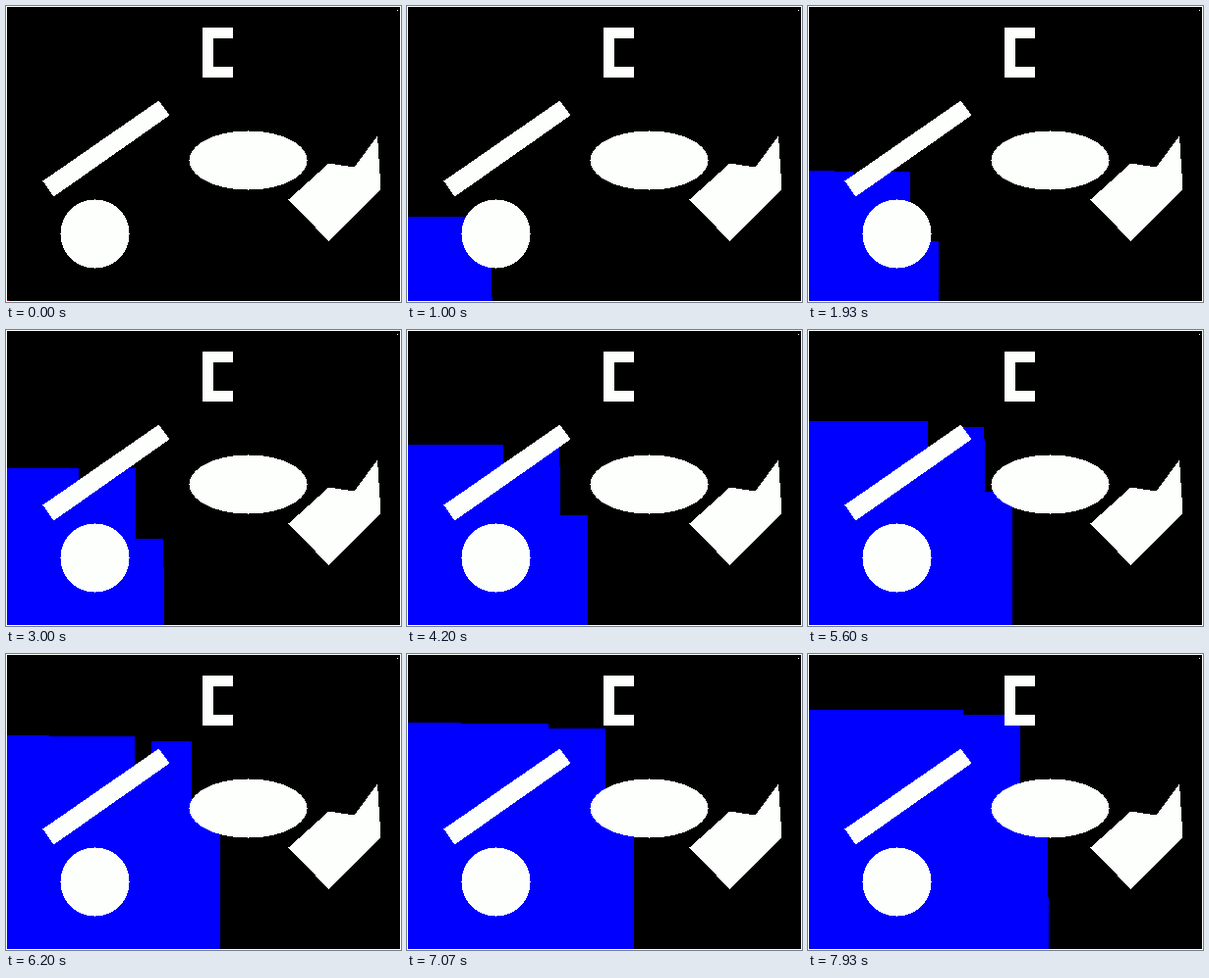
Animation of 402x302 px, one loop 8000 ms. Source, as an HTML page with a canvas:

```html
<!DOCTYPE html>
<html lang="en">
<head>
<meta charset="utf-8">
<title>Breadth-first flood around obstacles</title>
<style>
  html, body { margin: 0; width: 100%; height: 100%; overflow: hidden; background: #000; }
  canvas { display: block; width: 402px; height: 302px; }
</style>
</head>
<body>
<canvas id="stage" width="402" height="302"></canvas>
<script>
const WIDTH = 402, HEIGHT = 302;
const LOOP_MS = 8000, STEPS = 120, CELLS_PER_STEP = 400;
const WHITE = '#fdfffc', BLUE = '#0000ff';
const start = { x: 1, y: 300 };
const goal = { x: 398, y: 4 };

const bar = [[37, 178], [155, 96], [166, 111], [48, 194]];
const blade = [[287, 197], [328, 160], [354, 164], [377.5, 132], [381, 186], [328, 239.5]];

const inEllipse = (x, y, cx, cy, rx, ry) =>
  ((x - cx) / rx) ** 2 + ((y - cy) / ry) ** 2 <= 1;

const inBracket = (x, y) =>
  x >= 200 && x <= 230 && y >= 22 && y <= 72 && !(x > 210 && y > 32 && y < 62);

function inPolygon(x, y, points) {
  let inside = false;
  points.forEach(([ax, ay], i) => {
    const [bx, by] = points[(i + 1) % points.length];
    if (ay > y !== by > y && x < ax + (y - ay) * (bx - ax) / (by - ay)) inside = !inside;
  });
  return inside;
}

const isObstacle = (x, y) =>
  inEllipse(x, y, 90, 232, 35, 35) || inEllipse(x, y, 246, 157, 60, 30) ||
  inBracket(x, y) || inPolygon(x, y, bar) || inPolygon(x, y, blade);

const isBorder = (x, y) => x < 1 || y < 1 || x > WIDTH - 2 || y > HEIGHT - 2;

const ctx = document.getElementById('stage').getContext('2d');
const map = document.createElement('canvas');
map.width = WIDTH;
map.height = HEIGHT;
const mapCtx = map.getContext('2d');
const closed = new Uint8Array(WIDTH * HEIGHT);

function buildMap() {
  mapCtx.fillStyle = '#000';
  mapCtx.fillRect(0, 0, WIDTH, HEIGHT);
  mapCtx.fillStyle = WHITE;
  for (let y = 0; y < HEIGHT; y++) {
    for (let x = 0; x < WIDTH; x++) {
      if (!isBorder(x, y) && !isObstacle(x, y)) continue;
      closed[y * WIDTH + x] = 1;
      mapCtx.fillRect(x, y, 1, 1);
    }
  }
  mapCtx.fillRect(goal.x, goal.y, 1, 1);
  mapCtx.fillStyle = '#c00000';
  mapCtx.fillRect(start.x, start.y, 2, 1);
}

// Eight-way breadth-first search: returns cells in the order they are reached.
function explore(limit) {
  const moves = [[0, -1], [0, 1], [-1, 0], [1, 0], [1, -1], [-1, -1], [1, 1], [-1, 1]];
  const queue = [[start.x, start.y]];
  closed[start.y * WIDTH + start.x] = 1;
  for (let i = 0; i < queue.length && queue.length < limit; i++) {
    const [x, y] = queue[i];
    for (const [dx, dy] of moves) {
      const cell = (y + dy) * WIDTH + x + dx;
      if (closed[cell]) continue;
      closed[cell] = 1;
      queue.push([x + dx, y + dy]);
    }
  }
  return queue;
}

buildMap();
const order = explore(STEPS * CELLS_PER_STEP);
let painted = Infinity;

function draw(time) {
  const step = Math.floor(((time + 5) % LOOP_MS) * STEPS / LOOP_MS);
  const count = step * CELLS_PER_STEP;
  if (count < painted) {
    ctx.drawImage(map, 0, 0);
    painted = 0;
  }
  ctx.fillStyle = BLUE;
  for (; painted < count; painted++) ctx.fillRect(...order[painted], 1, 1);
}

const origin = performance.now();
function tick() {
  draw(performance.now() - origin);
  requestAnimationFrame(tick);
}
tick();
</script>
</body>
</html>
```
